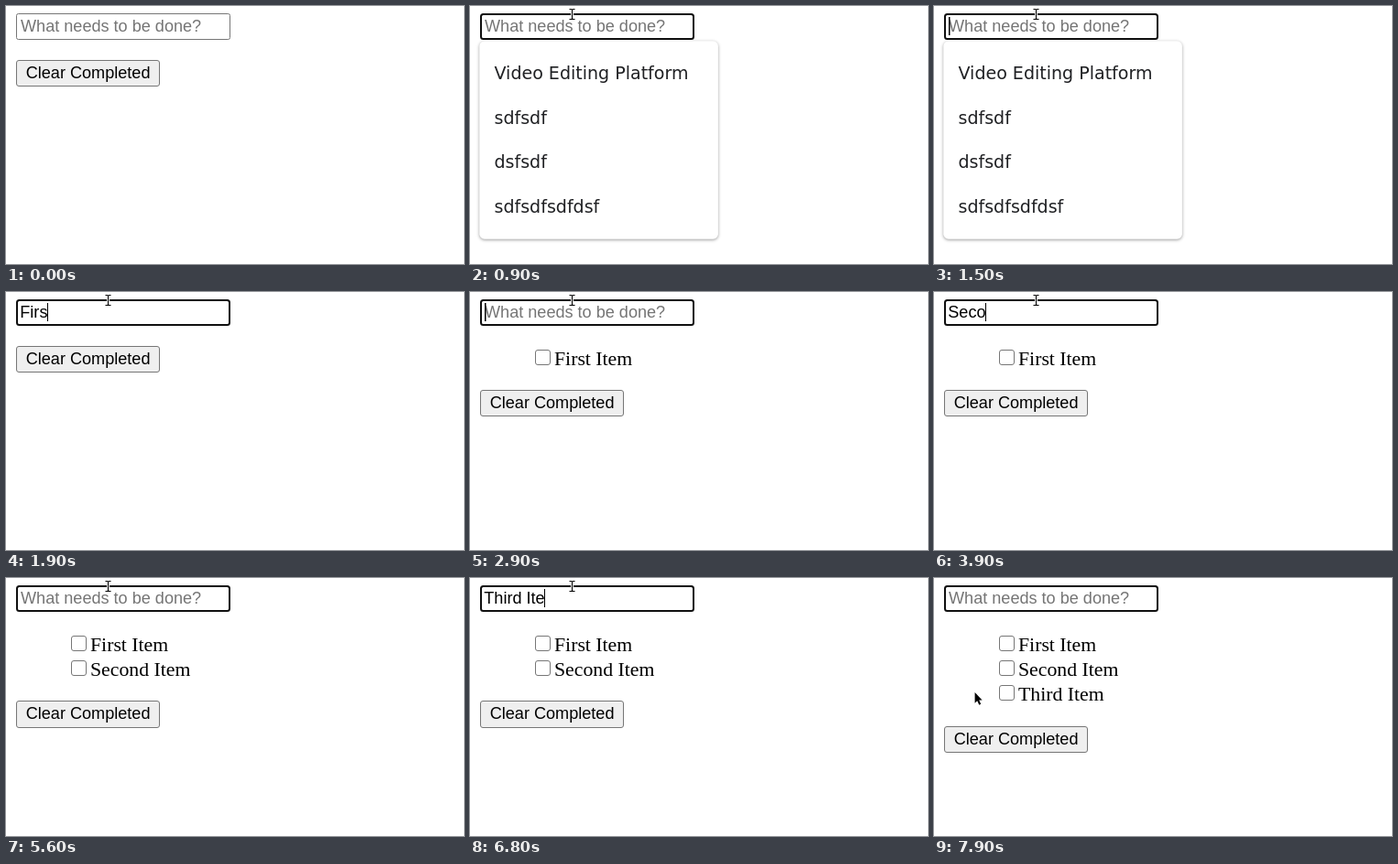
Write an HTML page with a canvas that moves like this. It is 500 px wide and 282 px high and loops after 8 s.

```html
<!DOCTYPE html>
<html lang="en">
<head>
<meta charset="utf-8">
<title>Todo list</title>
<style>
  html, body { margin: 0; height: 100%; overflow: hidden; background: #fff; }
  canvas { display: block; width: 500px; height: 282px; }
</style>
</head>
<body>
<canvas id="stage" width="500" height="282"></canvas>
<script>
const ctx = document.getElementById('stage').getContext('2d');
const LOOP = 8000;
const FOCUS = 300;
const BLINK = 600;
const SANS = '18.1px "Liberation Sans", Arial, sans-serif';
const SERIF = '21.76px "Liberation Serif", "Times New Roman", serif';
const MENU = '19.04px "DejaVu Sans", sans-serif';

// One key time per character, then the time of Enter.
const items = [
  { text: 'First Item', enter: 2900,
    keys: [1600, 1700, 1800, 1900, 2000, 2100, 2300, 2400, 2500, 2600] },
  { text: 'Second Item', enter: 5000,
    keys: [3600, 3700, 3800, 3900, 4000, 4000, 4200, 4400, 4500, 4600, 4700] },
  { text: 'Third Item', enter: 7100,
    keys: [5800, 6000, 6000, 6000, 6200, 6400, 6600, 6700, 6800, 6900] },
];
const inputTimes = [FOCUS, ...items.flatMap(item => [...item.keys, item.enter])];

const menus = [
  { from: 800, to: 1600, rows: ['Video Editing Platform', 'sdfsdf', 'dsfsdf', 'sdfsdfsdfdsf'] },
  { from: 3600, to: 3700, rows: ['sdfsdf', 'sdfsdfsdfdsf'] },
];

const pointerPath = [
  { at: 300, x: 111.5, y: 7 },
  { at: 500, x: 114.5, y: 14 },
  { at: 600, x: 111.5, y: 9 },
  { at: 7900, x: 44, y: 124.5, arrow: true },
];

function text(string, x, y, font, color = '#000') {
  ctx.font = font;
  ctx.fillStyle = color;
  ctx.fillText(string, x, y);
}

// The border lies inside the given box.
function box(x, y, w, h, radius, fill, stroke = '#767676', line = 1) {
  ctx.beginPath();
  ctx.roundRect(x + line / 2, y + line / 2, w - line, h - line, radius);
  ctx.fillStyle = fill;
  ctx.fill();
  ctx.strokeStyle = stroke;
  ctx.lineWidth = line;
  ctx.stroke();
}

function drawField(t, typed) {
  if (t < FOCUS) box(11, 8, 234, 29, 2, '#fff');
  else box(11, 8, 234, 29, 2.5, '#fff', '#101010', 2);

  if (typed) text(typed, 15.3, 28, SANS);
  else text('What needs to be done?', 16, 28, SANS, '#757575');

  const lastInput = inputTimes.filter(time => time <= t).pop();
  if (lastInput === undefined || (t - lastInput) % (2 * BLINK) >= BLINK) return;
  ctx.font = SANS;
  ctx.fillStyle = '#000';
  if (typed) ctx.fillRect(Math.floor(15.3 + ctx.measureText(typed).width), 12, 1, 20);
  else ctx.fillRect(16, 12, 1.5, 20);
}

function drawList(done) {
  done.forEach((item, i) => {
    const y = Math.round(i * 27.2);
    box(71, 63 + y, 17, 17, 2.5, '#fff');
    text(item.text, 92, 80 + y, SERIF);
  });
  const top = done.length ? 80 + done.length * 27.2 : 59;
  const y = Math.round(top);
  box(11, y, 157, Math.round(top + 29.2) - y, 2.5, '#efefef');
  text('Clear Completed', 21.7, y + 20, SANS);
}

function drawMenu(rows) {
  ctx.save();
  ctx.shadowColor = 'rgba(0, 0, 0, 0.4)';
  ctx.shadowBlur = 3.5;
  ctx.shadowOffsetY = 1;
  ctx.fillStyle = '#fff';
  ctx.beginPath();
  ctx.roundRect(10.3, 38.3, 260.6, 22 + rows.length * 48.6, 5.5);
  ctx.fill();
  ctx.restore();
  rows.forEach((row, i) => text(row, 26.5, Math.round(80 + i * 48.6), MENU, '#202124'));
}

function drawPointer({ x, y, arrow }) {
  ctx.save();
  ctx.translate(x, y);
  ctx.lineJoin = 'round';
  ctx.strokeStyle = '#fff';
  if (arrow) {
    const shape = new Path2D('M.6 .6V12.2L3.2 9.8 5.3 14.2 7.2 13.3 5.2 9H8.6Z');
    ctx.lineWidth = 1.4;
    ctx.stroke(shape);
    ctx.fillStyle = '#000';
    ctx.fill(shape);
  } else {
    const shape = new Path2D('M-3 -5.5H-1Q0 -5.5 0 -4.5 0 -5.5 1 -5.5H3M0 -4.5V4.5M-3 5.5H-1Q0 5.5 0 4.5 0 5.5 1 5.5H3');
    ctx.lineWidth = 3;
    ctx.stroke(shape);
    ctx.strokeStyle = '#000';
    ctx.lineWidth = 1.1;
    ctx.stroke(shape);
  }
  ctx.restore();
}

function draw(t) {
  ctx.fillStyle = '#fff';
  ctx.fillRect(0, 0, 500, 282);

  const done = items.filter(item => item.enter <= t);
  const current = items[done.length];
  const typed = current ? current.text.slice(0, current.keys.filter(key => key <= t).length) : '';
  drawField(t, typed);
  drawList(done);

  const menu = menus.find(({ from, to }) => t >= from && t < to);
  if (menu) drawMenu(menu.rows);
  const pointer = pointerPath.filter(({ at }) => at <= t).pop();
  if (pointer) drawPointer(pointer);
}

const start = performance.now();
function frame() {
  draw((performance.now() - start) % LOOP);
  requestAnimationFrame(frame);
}
frame();
</script>
</body>
</html>
```
